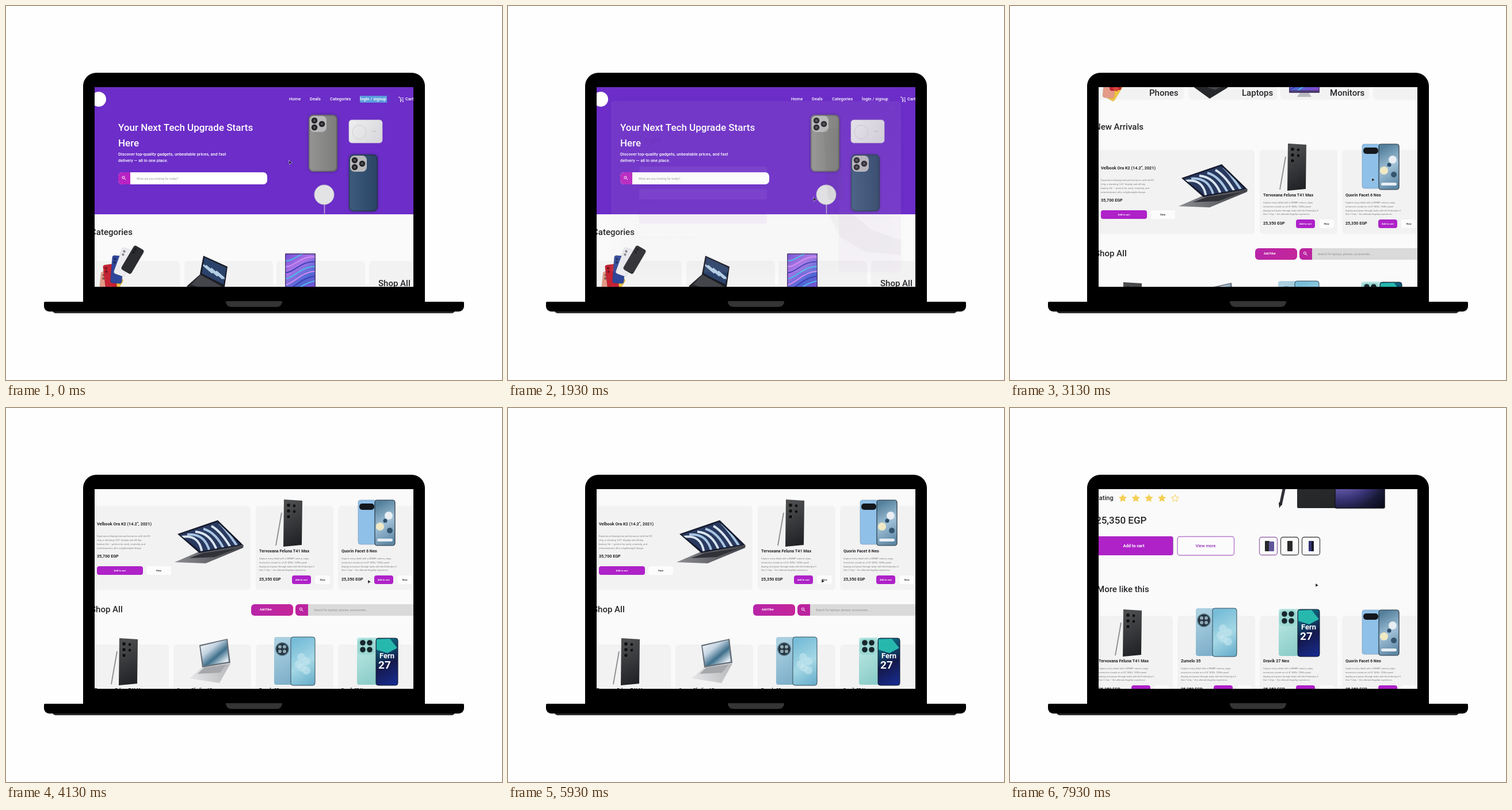
These frames come from a looping animation (862x650 px, 8 s). An HTML page with a canvas:

```html
<!DOCTYPE html>
<html lang="en">
<head>
<meta charset="utf-8">
<title>Shop demo on a laptop</title>
<style>
html, body { margin: 0; width: 100%; height: 100%; overflow: hidden; background: #fefefe; }
canvas { display: block; width: 862px; height: 650px; }
</style>
</head>
<body>
<canvas id="stage"></canvas>
<script>
const canvas = document.getElementById('stage');
const c = canvas.getContext('2d');
const ratio = window.devicePixelRatio || 1;
canvas.width = 862 * ratio;
canvas.height = 650 * ratio;

const LOOP = 8000, PRODUCT_OPENS = 5950;
const HERO = '#6c2dc8', PURPLE = '#ae22c8', MAGENTA = '#bb249f', INK = '#26262a';
const COLUMNS = [148, 291, 434, 577];
const BLURB = [
  'Capture every detail with a 200MP camera, enjoy',
  'immersive visuals on a 6.8" QHD+ 120Hz panel',
  'display, and power through tasks with the Emberlynx 5',
  'Gen 7 chip — the ultimate flagship experience.'
];

// Drawing helpers
function box(x, y, w, h, fill, r = 0, stroke, line = 1) {
  c.beginPath();
  c.roundRect(x, y, w, h, r);
  if (fill) { c.fillStyle = fill; c.fill(); }
  if (stroke) { c.strokeStyle = stroke; c.lineWidth = line; c.stroke(); }
}
function disc(x, y, r, fill, stroke) {
  box(x - r, y - r, 2 * r, 2 * r, fill, r, stroke);
}
function poly(points, fill) {
  c.beginPath();
  for (let i = 0; i < points.length; i += 2) c.lineTo(points[i], points[i + 1]);
  c.closePath();
  c.fillStyle = fill;
  c.fill();
}
function stroke(x0, y0, x1, y1, color, width) {
  c.beginPath();
  c.moveTo(x0, y0);
  c.lineTo(x1, y1);
  c.strokeStyle = color;
  c.lineWidth = width;
  c.stroke();
}
function text(str, x, y, size, fill = INK, weight = 500, align = 'left') {
  c.font = `${weight} ${size}px Roboto, sans-serif`;
  c.fillStyle = fill;
  c.textAlign = align;
  c.textBaseline = 'middle';
  c.fillText(str, x, y);
}
function lines(list, x, y, step, size, fill, weight = 400) {
  list.forEach((str, i) => text(str, x, y + i * step, size, fill, weight));
}
function gradient(x0, y0, x1, y1, ...colors) {
  const g = c.createLinearGradient(x0, y0, x1, y1);
  colors.forEach((color, i) => g.addColorStop(i / (colors.length - 1), color));
  return g;
}
function at(x, y, draw, angle = 0, scale = 1) {
  c.save();
  c.translate(x, y);
  c.rotate(angle);
  c.scale(scale, scale);
  draw();
  c.restore();
}
function button(label, x, y, w, h, fill, color, size = 4.2) {
  box(x, y, w, h, fill, 4);
  text(label, x + w / 2, y + h / 2, size, color, 600, 'center');
}
function magnifier(x, y) {
  disc(x - 1, y - 1, 2.1, null, '#fff');
  stroke(x + .6, y + .6, x + 3, y + 3, '#fff', 1);
}

// Eased value between [time, value] keys
function track(t, keys) {
  if (t <= keys[0][0]) return keys[0][1];
  for (let i = 1; i < keys.length; i++) {
    const [t0, v0] = keys[i - 1], [t1, v1] = keys[i];
    if (t < t1) {
      const p = (t - t0) / (t1 - t0);
      return v0 + (v1 - v0) * p * p * (3 - 2 * p);
    }
  }
  return keys[keys.length - 1][1];
}

// Products, drawn relative to the top left of their card
function darkPhone() {
  stroke(45, 12, 35, 69, '#8c8c8e', 1.8);
  poly([49, -11, 81, -9, 80, 68, 48, 71], gradient(48, 0, 81, 60, '#4c4d4f', '#222326'));
  for (const y of [-1, 9, 19]) disc(57, y, 3.6, '#111', '#555');
  disc(67, 0, 2.4, '#111');
  disc(67, 10, 2.4, '#111');
}
function bluePhone() {
  box(35, -10, 32, 77, '#8fc0e8', 4, '#7293ad', .6);
  box(37, -4, 26, 11, '#15181c', 5);
  box(64, -10, 35, 79, gradient(64, 0, 99, 60, '#54809c', '#9fc0d6', '#5f88a6'), 4, '#273541', 1.2);
  disc(88, 17, 7, '#e8eef2');
  disc(73, 36, 7, '#f0e9c4');
  disc(82, 26, 3.5, '#2e4d68');
  disc(90, 43, 5, '#35556f');
  box(68, 57, 27, 5, '#e7eef4', 2.5);
}
function aquaPhone() {
  box(32, -13, 34, 83, gradient(32, 0, 66, 60, '#abd0e0', '#7fb0cb'), 4);
  disc(46, 8, 12, '#64899c');
  disc(46, 8, 10.5, '#26353f');
  for (const [x, y] of [[42, 4], [50, 4], [42, 12], [50, 12]]) disc(x, y, 3, '#8ea9b5');
  box(61, -13, 42, 84, gradient(61, 0, 103, 70, '#78bdd8', '#a5d8e6', '#64abc9'), 4, '#314a59', 1);
  for (const [x, y] of [[79, 22], [88, 29], [80, 40], [88, 45], [75, 34]]) disc(x, y, 7, '#c4e6ef99');
}
function mintPhone() {
  box(33, -12, 36, 82, gradient(33, 0, 69, 60, '#bce8e4', '#8ccdc9'), 4);
  box(34, -10, 30, 28, '#9bd6d2', 7);
  for (const [x, y] of [[43, -3], [55, -3], [43, 9], [55, 9]]) disc(x, y, 4.8, '#17272c');
  box(66, -11, 38, 82, gradient(66, 0, 104, 70, '#0d6f83', '#15194c', '#172d94'), 4, '#101a2c', 1);
  poly([67, -9, 90, -10, 103, 6, 86, 15, 67, 9], '#27b8ad');
  text('Fern', 85, 20, 13, '#fff', 700, 'center');
  text('27', 81, 36, 19, '#fff', 700, 'center');
}
function silverLaptop() {
  poly([50, 40, 99, 33, 80, 67, 28, 59], gradient(30, 60, 99, 35, '#e5e5e7', '#b6b7ba'));
  poly([54, 40, 92, 35, 81, 49, 42, 51], '#a5a7ab');
  poly([45, 1, 94, -10, 99, 32, 50, 40], '#66707a');
  poly([47, 3, 92, -8, 96, 30, 52, 37], gradient(48, 0, 80, 38, '#eef2f6', '#c5d5e2', '#3e6f8c', '#dfe9ef'));
}
// Open notebook with a swirling wallpaper
function notebook() {
  poly([44, 54, 120, 43, 119, 48, 54, 75, 0, 73], gradient(0, 75, 110, 45, '#8c8e93', '#45474d'));
  poly([49, 57, 108, 49, 70, 64, 25, 66], '#303238');
  const screen = [5, 24, 75, 0, 119, 43, 43, 57];
  poly(screen, '#15192b');
  c.save();
  poly([9, 25, 74, 3, 114, 42, 45, 54], '#29395f');
  c.clip();
  for (let i = 0; i < 6; i++) {
    c.beginPath();
    c.moveTo(8 + i * 14, 30 - i * 5);
    c.quadraticCurveTo(45 + i * 10, 22, 48 + i * 14, 60);
    c.strokeStyle = i % 2 ? '#a9c6e2' : '#d9e5ef';
    c.lineWidth = 4;
    c.stroke();
  }
  c.restore();
}

function card(x, y, title, draw) {
  box(x, y, 135, 146, '#f2f2f2', 6);
  at(x, y, draw);
  text(title, x + 6, y + 79, 7.2, INK, 600);
  lines(BLURB, x + 6, y + 92, 6.7, 4, '#77777b');
  text('25,350 EGP', x + 6, y + 128, 7.2, INK, 600);
  button('Add to cart', x + 63, y + 121, 33, 15, PURPLE, '#fff');
  button('View', x + 103, y + 121, 26, 15, '#fcfcfc', INK);
}
const flagship = (x, y) => card(x, y, 'Tervoxana Feluna T41 Max', darkPhone);

function caseBack(x, y, light, dark) {
  c.save();
  c.shadowColor = '#0005';
  c.shadowBlur = 5 * ratio;
  box(x, y, 50, 99, gradient(x, y, x + 50, y, light, dark), 8);
  c.restore();
  box(x + 1, y + 1, 48, 97, null, 7, '#00000044', 1.5);
  box(x + 2, y + 2, 29, 28, '#b9b9bb', 8);
  for (const [dx, dy] of [[10, 10], [10, 22], [23, 16]]) {
    disc(x + dx, y + dy, 5.3, '#242428');
    disc(x + dx, y + dy, 2, '#57575f');
  }
}

function hero(t) {
  box(154, 141, 554, 221, HERO);
  disc(161, 162, 13, '#fff');
  if (t < 280) box(615, 156, 47, 12, '#5a9bdc');
  text('Home', 492, 162, 7.5, '#fff');
  text('Deals', 528, 162, 7.5, '#fff');
  text('Categories', 563, 162, 7.5, '#fff');
  text('login / signup', 615, 162, 7.5, '#fff');
  text('Cart', 694, 162, 7.5, '#fff');
  stroke(682, 158, 685, 159, '#fff', 1);
  stroke(685, 159, 686, 164, '#fff', 1);
  stroke(685, 164, 691, 163, '#fff', 1);
  stroke(687, 160, 691, 160, '#fff', 1);
  disc(686, 166, 1, '#fff');
  disc(690, 166, 1, '#fff');

  text('Your Next Tech Upgrade Starts', 195, 212, 17, '#fff');
  text('Here', 195, 239, 17, '#fff');
  lines(['Discover top-quality gadgets, unbeatable prices, and fast', 'delivery — all in one place.'],
    195, 258, 11.3, 7.4, '#fff', 500);
  box(195, 289, 259, 21, '#fff', 7);
  box(195, 289, 21, 21, '#b923c2', [7, 0, 0, 7]);
  magnifier(205, 299);
  text('What are you looking for today?', 227, 300, 5.2, '#999', 400);

  caseBack(526, 189, '#959593', '#7c7c7a');
  caseBack(596, 258, '#3d5c7d', '#2a4464');
  box(596, 198, 58, 40, gradient(596, 198, 654, 238, '#eeeef0', '#d7d7db'), 5, '#c6c6cc', .7);
  disc(614, 219, 12, null, '#cfcfd3');
  box(636, 217, 7, 1.5, '#c4c4c8');
  stroke(553.5, 345, 553.5, 361, '#bba8dc', 1.6);
  disc(553, 328, 17, '#e3e3e6', '#c9c9ce');
}

function categories() {
  text('Categories', 147, 394, 15);
  for (const x of [148, 310, 470, 631]) box(x, 443, 154, 70, '#f2f2f2', 6);
  const stack = [
    [184, 491, '#efc441', .55], [173, 486, '#e39a86', .1], [181, 473, '#c42334', -.12],
    [193, 458, '#30469a', .08], [204, 445, '#ececf0', .35], [220, 441, '#2b2c30', .53]
  ];
  for (const [x, y, color, angle] of stack) {
    at(x, y, () => {
      box(-10, -24, 20, 48, color, 4, '#00000022', .7);
      disc(-5, -18, 2.2, '#00000066');
      disc(-5, -12, 2.2, '#00000066');
    }, angle);
  }
  poly([182, 486, 189, 493, 186, 499, 178, 494], '#d6453c');

  poly([340, 464, 380, 487, 378, 492, 347, 511, 314, 487], '#26272b');
  poly([338, 467, 374, 487, 356, 496, 322, 484], '#43454b');
  poly([343, 434, 385, 453, 380, 488, 337, 466], '#191b25');
  c.save();
  poly([345, 437, 383, 455, 378, 484, 340, 465], '#2b426a');
  c.clip();
  for (let i = 0; i < 4; i++) stroke(338 + i * 9, 446 + i * 5, 359 + i * 9, 464 + i * 5, '#b4cfe5', 3);
  c.restore();

  poly([505, 499, 518, 499, 524, 508, 499, 508], '#b9bbc0');
  box(485, 430, 53, 71, '#4c3b70', 1);
  c.save();
  box(486.5, 431.5, 50, 65, gradient(487, 432, 537, 496, '#7450d5', '#a873e8', '#4e69d4', '#8c47d3'));
  c.clip();
  for (let i = 0; i < 7; i++) {
    c.beginPath();
    c.moveTo(480, 441 + i * 11);
    c.bezierCurveTo(500, 450 + i * 9, 511, 420 + i * 10, 542, 429 + i * 8);
    c.strokeStyle = ['#4bbbe6', '#d58cf0', '#3e3fb4'][i % 3];
    c.lineWidth = 2;
    c.stroke();
  }
  c.restore();

  text('Phones', 242, 502, 15);
  text('Laptops', 403, 502, 15);
  text('Monitors', 556, 502, 15);
  text('Shop All', 647, 483, 15);
}

function arrivals() {
  text('New Arrivals', 147, 561, 15);
  box(148, 600, 277, 146, '#f2f2f2', 6);
  text('Velbook Ora K2 (14.2", 2021)', 158, 632, 7.3, INK, 600);
  lines(['Experience blazing-fast performance with the K2', 'chip, a stunning 14.2" display and all-day',
    'battery life — perfect for work, creativity, and', 'entertainment, all in a lightweight design.'],
    158, 653, 7, 4.3, '#77777b');
  text('35,700 EGP', 158, 688, 7.2, INK, 600);
  button('Add to cart', 158, 705, 80, 15, PURPLE, '#fff');
  button('View', 244, 705, 43, 15, '#fcfcfc', INK);
  at(293, 625, notebook);
  flagship(COLUMNS[2], 600);
  card(COLUMNS[3], 600, 'Quorin Facet 6 Neo', bluePhone);
}

function shopAll() {
  text('Shop All', 147, 781, 15);
  box(426, 771, 73, 20, gradient(426, 0, 499, 0, '#b725a8', '#c4259a'), 6);
  text('Add Filter', 441, 781, 4.8, '#fff', 600);
  box(503, 771, 230, 20, '#dadada', 6);
  box(503, 771, 22, 20, MAGENTA, [6, 0, 0, 6]);
  magnifier(513.5, 780.5);
  text('Search for laptops, phones, accessories...', 535, 781, 5.1, '#929292', 400);
  flagship(COLUMNS[0], 841);
  card(COLUMNS[1], 841, 'Orvane Slimline 15', silverLaptop);
  card(COLUMNS[2], 841, 'Zumelo 35', aquaPhone);
  card(COLUMNS[3], 841, 'Dravik 27 Neo', mintPhone);
}

function loginDialog(opacity) {
  if (!opacity) return;
  c.save();
  c.globalAlpha = opacity;
  c.save();
  c.shadowColor = '#0004';
  c.shadowBlur = 14 * ratio;
  box(179, 165, 504, 298, '#fbfafd', 5);
  c.restore();
  box(575, 165, 108, 298, gradient(575, 165, 683, 463, '#7534b8', '#d9a4ea'), [0, 5, 5, 0]);
  poly([548, 345, 569, 362, 590, 355, 632, 389, 683, 407, 683, 433, 620, 427, 578, 402], '#77717a');
  at(566, 275, () => box(-14, -62, 28, 124, '#48424f', 5), -.06);
  text('×', 669, 177, 10, '#fff', 400, 'center');
  text('Login', 228, 233, 15.5, '#2b1748', 700);
  text('Email', 228, 272, 6, '#444');
  box(228, 279, 222, 18, '#f1eef5', 3);
  text('Password', 228, 312, 6, '#444');
  box(228, 318, 222, 18, '#f1eef5', 3);
  text('Remember', 228, 342, 5.5, '#444', 700);
  button('Login', 228, 357, 222, 21, '#7f2fc0', '#fff', 6);
  text('No account yet? Create one in a minute', 228, 402, 5.5, '#999', 400);
  c.restore();
}

function star(x, y, filled) {
  const points = [];
  for (let i = 0; i < 10; i++) {
    const r = i % 2 ? 3.7 : 7.5, a = i * Math.PI / 5 - Math.PI / 2;
    points.push(x + r * Math.cos(a), y + r * Math.sin(a));
  }
  poly(points, '#f5cf55');
  if (!filled) at(x, y, () => poly(points.map((v, i) => v - (i % 2 ? y : x)), '#fbfafa'), 0, .72);
}

function flagshipPhoto() {
  stroke(495, 253, 470, 369, '#303136', 5);
  poly([467, 364, 473, 366, 468, 374], '#222');
  box(499, 186, 67, 188, gradient(499, 186, 566, 374, '#38393b', '#242527'), 2);
  for (const y of [201, 222, 242]) disc(516, y, 7.5, '#0c0d10', '#4b4c50');
  disc(535, 201, 5.5, '#0c0d10', '#4b4c50');
  disc(535, 222, 5.5, '#0c0d10', '#4b4c50');
  disc(535, 212, 2, '#6d6e73');
  const glow = c.createRadialGradient(576, 294, 5, 576, 294, 105);
  [[0, '#bcaef2'], [.28, '#796cc0'], [.6, '#393476'], [.8, '#191a38'], [1, '#0a0b1b']]
    .forEach(([stop, color]) => glow.addColorStop(stop, color));
  box(565, 186, 86, 188, glow, 2, '#15161d', 1.5);
  at(607, 334, () => text('Feluna', 0, 0, 28, '#fff'), -Math.PI / 2);
  at(636, 337, () => text('T41 Max', 0, 0, 28, '#fff'), -Math.PI / 2);
}

function productPage(t) {
  const x = 149;
  text('Tervoxana Feluna T41 Max (256GB,', x, 167, 17);
  text('Shadow Black)', x, 194, 17);
  text('Description', 148, 221, 9.6, '#5c5c60', 400);
  lines(['Meet the Feluna T41 Max – Tervoxana\'s ultimate powerhouse.',
    'Featuring a 6.8" Edge QHD+ AMOLED 120Hz display, a jaw-',
    'dropping 200MP main camera, and the latest Emberlynx 5',
    'Gen 7 for Feluna chip, this phone is designed for epic',
    'productivity, creativity, and mobile photography. Includes built-',
    'in T Nib and long-lasting 5000mAh battery.'], x, 234.5, 13.5, 8.5, '#66666a');
  text('View more', 148, 320, 9.7);
  box(148, 325, 47, 1, INK);
  text('Rating', 148, 357, 11);
  for (let i = 0; i < 5; i++) star(196 + i * 22.7, 357, i < 4);
  text('25,350 EGP', x, 396, 17);

  const ready = track(t, [[6650, 0], [6950, 1]]);
  box(147, 423, 137, 33, '#a58abd', 4);
  c.globalAlpha = ready;
  button('Add to cart', 147, 423, 136, 33, PURPLE, '#fff', 7.4);
  c.globalAlpha = 1;
  box(291, 423.5, 98.5, 32.5, '#fcfbfc', 4, '#b878d0', 1.4);
  text('View more', 340, 440, 7.4, '#9430b8', 500, 'center');

  flagshipPhoto();
  [433, 470, 507].forEach((left, i) => {
    box(left + .5, 424.5, 31, 31, '#fafafa', 4, i ? '#4a494d' : '#9a6cab', 1.3);
    box(left + (i ? 12 : 10), 431, i ? 9 : 8, 18, i === 2 ? '#343572' : '#29292c', 1);
    if (i !== 1) box(left + 17, 432, i ? 4 : 9, 17, i ? '#17182a' : '#5f5799', 1);
  });

  text('More like this', 151, 516, 15);
  flagship(COLUMNS[0], 561);
  card(COLUMNS[1], 561, 'Zumelo 35', aquaPhone);
  card(COLUMNS[2], 561, 'Dravik 27 Neo', mintPhone);
  card(COLUMNS[3], 561, 'Quorin Facet 6 Neo', bluePhone);
}

const POINTER = [
  [0, 494, 272], [380, 627, 167], [600, 627, 167], [1080, 669, 177], [1180, 669, 177],
  [1330, 627, 167], [1930, 533, 336], [2500, 533, 336], [3130, 631, 302], [4200, 631, 302],
  [5200, 561, 345], [5700, 547, 301], [6000, 547, 301], [6670, 532, 303], [7930, 533, 308]
];
function pointer(t) {
  const x = track(t, POINTER.map(k => [k[0], k[1]]));
  const y = track(t, POINTER.map(k => [k[0], k[2]]));
  at(x, y, () => {
    poly([-3, -4.5, 4.2, .8, .8, 1.6, -1.8, 4.5], '#ffffff99');
    poly([-2, -3, 3, .6, .3, 1, -1.4, 3.2], '#19191d');
  });
}

function laptop() {
  box(134, 116, 594, 404, '#000', [23, 23, 0, 0]);
  box(81, 528, 699, 6, '#2b2b2c', [0, 0, 5, 5]);
  box(66, 514, 730, 17, '#000', [2, 2, 9, 9]);
  box(382, 513, 98, 10, '#343435', [0, 0, 9, 9]);
}

function frame(now) {
  const t = now % LOOP;
  c.setTransform(ratio, 0, 0, ratio, 0, 0);
  box(0, 0, 862, 650, '#fefefe');
  laptop();
  c.save();
  box(154, 141, 554, 347, '#fafafa');
  c.clip();
  if (t < PRODUCT_OPENS) {
    const scroll = track(t, [[2100, 0], [3050, 350], [3350, 350], [3800, 430]]);
    at(0, -scroll, () => {
      hero(t);
      categories();
      arrivals();
      shopAll();
    });
    loginDialog(track(t, [[450, 0], [600, 1], [1180, 1], [1300, .15], [1930, .06], [2150, 0]]));
  } else {
    at(0, -track(t, [[6850, 0], [7600, 200]]), () => productPage(t));
  }
  pointer(t);
  c.restore();
  requestAnimationFrame(frame);
}
requestAnimationFrame(frame);
</script>
</body>
</html>
```
